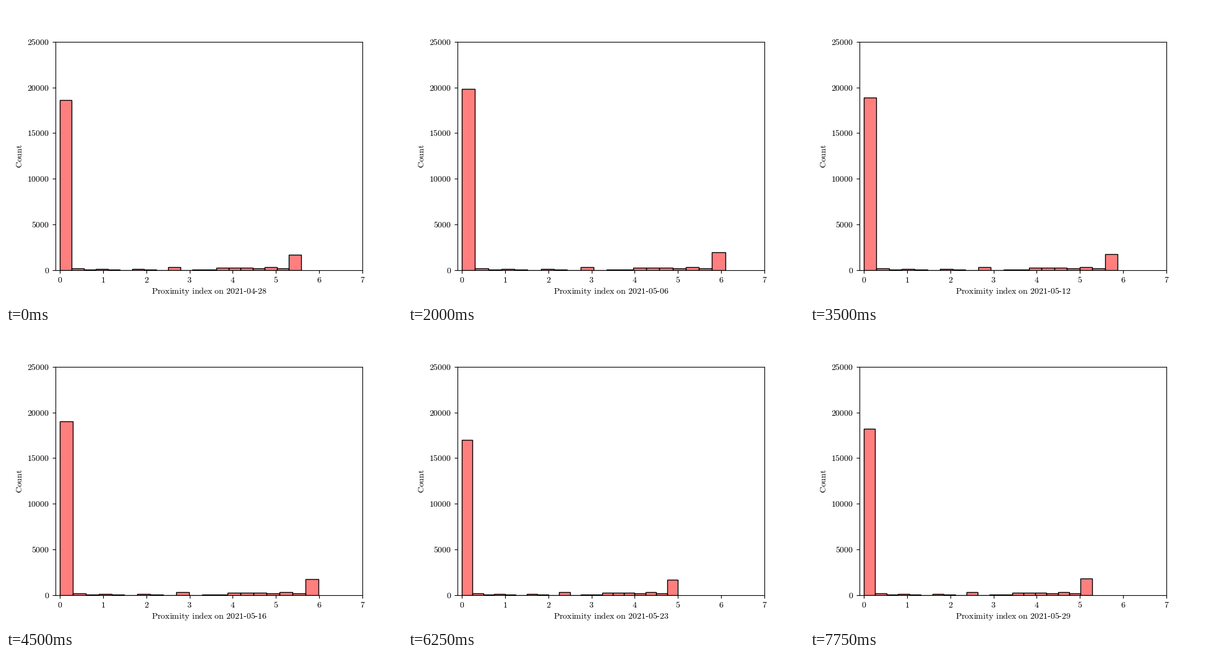
Animation, 640 px wide and 480 px high, one loop 8 s. Source, as a matplotlib script:

```python
import matplotlib.pyplot as plt
import numpy as np
from matplotlib.animation import FuncAnimation

W, H, DPI = 640, 480, 100
FRAMES, STEP_MS, BINS = 32, 250, 20

plt.rcParams["mathtext.fontset"] = "cm"

# Key days: day, widest value, count of the first bin, count of the last bin
KEYS = np.array([
    (0, 5.58, 18600, 1680),
    (5, 7.18, 21000, 1960),
    (10, 5.37, 19000, 2030),
    (14, 5.87, 18880, 1760),
    (21, 6.06, 19150, 1830),
    (25, 5.0, 17000, 1690),
    (28, 5.93, 18600, 1760),
    (30, 5.26, 19550, 1830),
    (31, 5.28, 18220, 1830),
])
# Typical counts of the bins in between
MIDDLE = [190, 100, 120, 110, 10, 170, 70, 0, 380,
          10, 90, 110, 270, 280, 260, 250, 320, 210]


def roman(text):
    words = text.replace("-", "\u2010").split()
    return "$" + r"\ ".join(r"\mathrm{%s}" % w for w in words) + "$"


def date_label(day):
    month, date = (4, 28 + day) if day < 3 else (5, day - 2)
    return roman(f"Proximity index on 2021-{month:02d}-{date:02d}")


def put_text(x, y, text, **style):
    """Place text at pixels counted from the lower left corner."""
    return fig.text(x / W, y / H, text, **style)


def tick_label(x, y, value, ha):
    # Whole pixels keep the baselines of all digits level
    put_text(x, round(y) + 0.4, roman(str(value)), ha=ha, va="center_baseline")


fig = plt.figure(figsize=(W / DPI, H / DPI), dpi=DPI, facecolor="white")
ax = fig.add_axes([0.125, 0.11, 0.775, 0.77])
bars = ax.bar(range(BINS), [0] * BINS, align="edge",
              facecolor=(1, 0, 0, 0.5), edgecolor="black", linewidth=1)
ax.set(xlim=(-0.1, 7), ylim=(0, 25000),
       xticks=range(8), yticks=range(0, 25001, 5000))
ax.tick_params(labelbottom=False, labelleft=False)

for value in range(8):
    tick_label(ax.transData.transform((value, 0))[0], 38, value, "center")
for value in range(0, 25001, 5000):
    tick_label(70.3, ax.transData.transform((0, value))[1], value, "right")

x_label = put_text(328, 15, "", ha="center", va="baseline")
put_text(26, 237.6, roman("Count"), rotation=90,
         rotation_mode="anchor", ha="center", va="baseline")


def update(day):
    widest, first, last = (np.interp(day, KEYS[:, 0], column)
                           for column in KEYS.T[1:])
    width = widest / BINS
    for k, (bar, height) in enumerate(zip(bars, [first, *MIDDLE, last])):
        bar.set_bounds(k * width, 0, width, height)
    x_label.set_text(date_label(day))
    return [*bars, x_label]


anim = FuncAnimation(fig, update, frames=FRAMES, interval=STEP_MS,
                     repeat=True, repeat_delay=0, blit=False)
plt.show()
```
